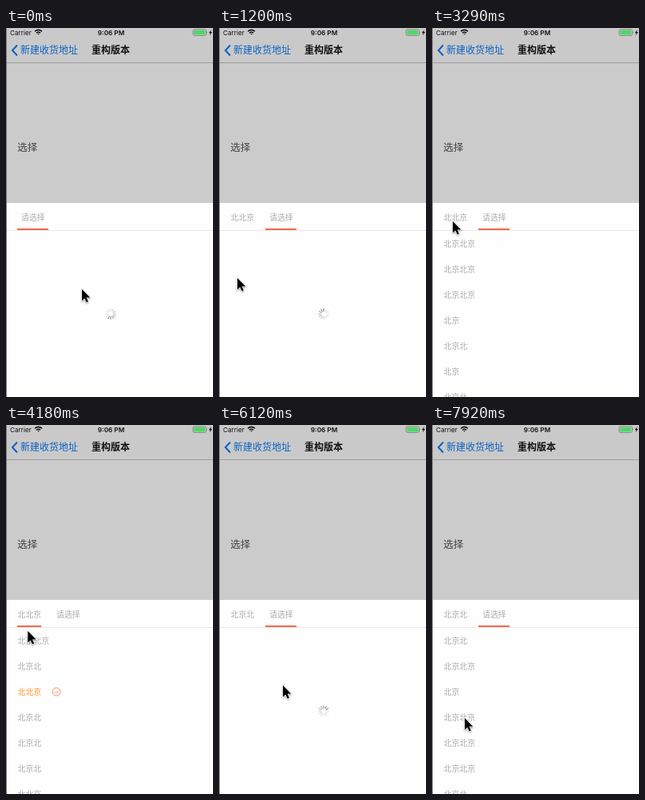
Write an HTML page that moves like this. It is 259x462 px and loops after 8000 ms.

```html
<!DOCTYPE html>
<html lang="zh">
<meta charset="utf-8">
<title>选择地址</title>
<style>
html, body { margin: 0; width: 100%; height: 100%; overflow: hidden; background: #fff }
svg { display: block; width: 100vw; height: 100vh }
text { font-family: "Noto Sans CJK SC", "Noto Sans CJK", sans-serif }
.status { font-family: Inter, Roboto, sans-serif; font-size: 8.2px; fill: #111 }
.soft { font-size: 9.9px; fill: #aaa }
.on { fill: #ff9326 }
</style>
<svg viewBox="0 0 259 462">
  <rect width="259" height="462" fill="#cbcbcb"/>
  <rect width="259" height="43" fill="#c9c9c9"/>
  <rect y="43" width="259" height="1" fill="#9d9d9d"/>
  <text class="status" x="5" y="8.8">Carrier</text>
  <g fill="none" stroke="#111" stroke-width="1.5">
    <path d="M36 4.3Q40.500 .4 45 4.300M37.900 6.300Q40.500 4.100 43.100 6.300"/>
    <path d="M39.300 7.100H41.700L40.500 8.600Z" fill="#111" stroke="none"/>
  </g>
  <text class="status" x="131.500" y="8.800" text-anchor="middle" font-weight="600">9:06 PM</text>
  <rect x="234" y="1.800" width="16.500" height="7.600" rx="1.800" fill="none" stroke="#777" stroke-width=".8"/>
  <rect x="235.200" y="3" width="14" height="5.200" rx=".8" fill="#4cd964"/>
  <path d="M251.500 4.300q1.300 1.300 0 2.600z" fill="#777"/>
  <path d="M256.800 2L253.800 6.200H255.700L254.900 9.200L258 4.900H256.100Z" fill="#111"/>
  <path d="M14 21.500L8 28L14 34.500" fill="none" stroke="#0a62c4" stroke-width="2"/>
  <text x="18" y="32.300" font-size="12" fill="#0a62c4">新建收货地址</text>
  <text x="107" y="32.300" font-size="12" font-weight="700" fill="#111">重构版本</text>
  <text x="14.300" y="154" font-size="12.500" fill="#444">选择</text>
  <rect y="219" width="259" height="243" fill="#fefefe"/>
  <rect y="253" width="259" height="1" fill="#e8e8e8"/>
  <text class="soft" id="picked" x="14.500" y="240.600"></text>
  <text class="soft" id="prompt" y="240.600">请选择</text>
  <rect id="bar" y="251" height="2" fill="#f5694a"/>
  <g id="provinces"></g>
  <g id="cities"></g>
  <g id="spinner" transform="translate(131 358)"></g>
  <rect width="1" height="462" fill="#777"/>
  <path id="cursor" d="M0 0V14.500L3.300 11.400L5.700 16.500L7.900 15.500L5.600 10.500H10.300Z" stroke="#fff" stroke-width="1.200" paint-order="stroke" style="filter:drop-shadow(0 1px 1px #0006)"/>
</svg>
<script>
const LOOP = 8000, STEP = 149.08, WIDTH = 259;
const $ = id => document.getElementById(id);

const provinces = ['北京北京', '北京北', '北北京', '北京北', '北京北', '北京北', '北北京'];
const firstCities = ['北京北京', '北京北京', '北京北京', '北京', '北京北', '北京', '北京北'];
const nextCities = ['北京北', '北京北京', '北京', '北京北京', '北京北京', '北京北京', '北京北'];

// Keys: [step, value, ...]
const pointer = [
  [0, 95, 327], [2, 146, 340], [5, 30, 326], [6, 28, 326], [8, 23, 313],
  [11, 3, 285], [14, 12, 262], [16, 29, 245], [22, 26, 242], [27, 26, 242],
  [30, 30, 290], [33, 33, 301], [35, 42, 306], [39, 66, 312], [41, 80, 326],
  [46, 82, 350], [49, 85, 377], [51, 65, 358], [53, 41, 367]
];
const scroll = [
  [0, 0], [5, 0], [6, 20], [7, WIDTH], [25, WIDTH], [26, 84],
  [27, 0], [32, 0], [33, 7], [34, WIDTH]
];

function track(keys, k) {
  const i = keys.findIndex(key => key[0] > k);
  if (i < 0) return keys[keys.length - 1].slice(1);
  const a = keys[i - 1], b = keys[i], p = (k - a[0]) / (b[0] - a[0]);
  return a.slice(1).map((v, j) => v + (b[j + 1] - v) * p);
}

function rows(names, chosen) {
  return names.map((name, i) => {
    const y = 270 + 32 * i, on = i === chosen;
    const tick = on ? `<g fill="none" stroke="#ff8f5c"><circle cx="63" cy="${y}" r="5"/>
      <path d="M60.500 ${y}l2 2l3.500-3.800"/></g>` : '';
    return `<text class="soft${on ? ' on' : ''}" x="14.500" y="${y + 3.600}">${name}</text>${tick}`;
  }).join('');
}

const spokes = Array.from({ length: 12 }, (_, i) =>
  `<path d="M0-3.500V-6.500" stroke-width="1.200" stroke-linecap="round" transform="rotate(${i * 30})"/>`);
$('spinner').innerHTML = spokes.join('');

function spin(k) {
  const [start, phase] = k < 6 ? [0, 7] : k < 33 ? [8, 12] : [33, 12];
  const head = Math.floor(phase + (k - start) * 1.79) + 12;
  [...$('spinner').children].forEach((spoke, i) => {
    const age = (head - i) % 12, shade = Math.min(228, 140 + age * 12);
    spoke.setAttribute('stroke', `rgb(${shade},${shade},${shade})`);
  });
}

function draw(k) {
  const chosen = k < 6 ? -1 : k < 33 ? 2 : 1;
  const [offset] = track(scroll, k);
  const loading = k < 3 || k >= 6 && k < 21 || k >= 33 && k < 47;
  const back = k >= 26 && k < 33;

  $('picked').textContent = chosen < 0 ? '' : provinces[chosen];
  $('prompt').setAttribute('x', chosen < 0 ? 19 : 63);
  $('bar').setAttribute('x', chosen < 0 || back ? 14 : 58);
  $('bar').setAttribute('width', back ? 30 : 39);

  $('provinces').innerHTML = k < 3 ? '' : rows(provinces, chosen);
  $('provinces').setAttribute('transform', `translate(${-offset})`);
  $('cities').innerHTML = k >= 47 ? rows(nextCities) : k >= 21 && k < 33 ? rows(firstCities) : '';
  $('cities').setAttribute('transform', `translate(${WIDTH - offset})`);

  $('spinner').style.display = loading ? '' : 'none';
  spin(k);
  $('cursor').setAttribute('transform', `translate(${track(pointer, k)})`);
}

let shown = -1;
const began = performance.now();
function tick(now) {
  const k = Math.floor(Math.max(0, now - began) % LOOP / STEP);
  if (k !== shown) draw(shown = k);
  requestAnimationFrame(tick);
}
tick(began);
</script>
</html>
```
